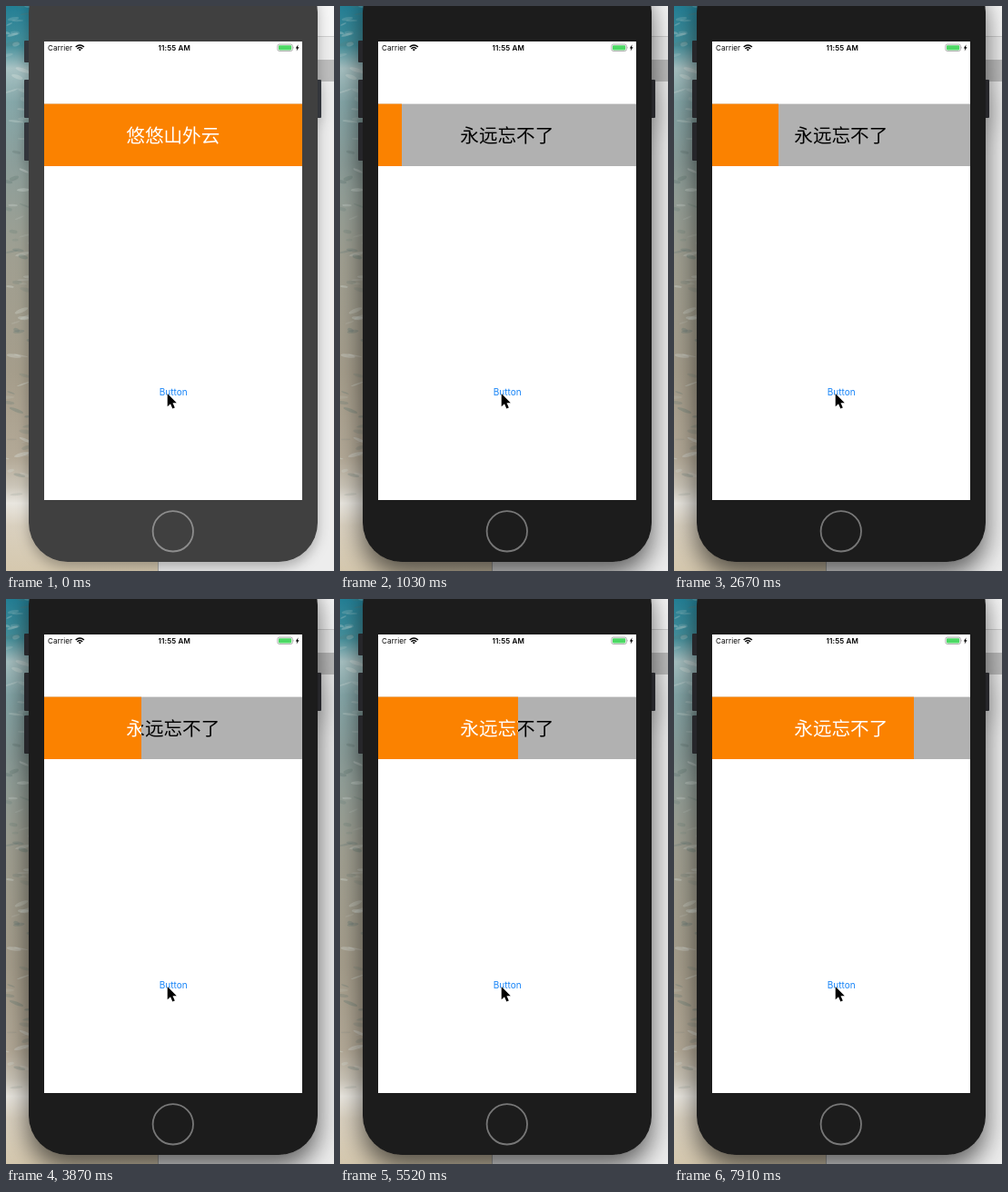
Animation of 361 by 621 pixels, one loop 8000 ms. Source, as an HTML page:

```html
<!DOCTYPE html>
<html lang="zh-CN">
<head>
<meta charset="utf-8">
<title>Banner wipe</title>
<style>
  html, body { margin: 0; width: 100%; height: 100%; overflow: hidden; background: #ececec; }
  svg { display: block; width: 361px; height: 621px; }
  text { font-family: Inter, "Liberation Sans", sans-serif; }
  .title { font: 400 20.6px "Noto Sans CJK SC", "Noto Sans CJK", sans-serif; text-anchor: middle; }
  .bezel { fill: #404040; }
  .key { fill: #31343a; }
  .home { fill: none; stroke: #8d8d8d; stroke-width: 1.8; }
  .phone { filter: url(#softShadow); }
  .active .phone { filter: url(#deepShadow); }
  .active .bezel { fill: #1b1b1b; }
  .active .key { fill: #25272b; }
  .active .home { stroke: #777; }
</style>
</head>
<body>
<svg id="stage" viewBox="0 0 361 621">
  <defs>
    <linearGradient id="beach" x2="0" y2="1">
      <stop offset="0" stop-color="#237f95"/>
      <stop offset=".07" stop-color="#46919d"/>
      <stop offset=".11" stop-color="#a9c3c4"/>
      <stop offset=".17" stop-color="#86a8aa"/>
      <stop offset=".28" stop-color="#8d9f9b"/>
      <stop offset=".45" stop-color="#a09f91"/>
      <stop offset=".65" stop-color="#a59d8b"/>
      <stop offset=".8" stop-color="#b3a997"/>
      <stop offset=".85" stop-color="#cbc5b8"/>
      <stop offset=".88" stop-color="#e9e6df"/>
      <stop offset=".92" stop-color="#d9d0bf"/>
      <stop offset="1" stop-color="#d5c8ae"/>
    </linearGradient>
    <filter id="softShadow" filterUnits="userSpaceOnUse" x="-60" y="-100" width="480" height="800">
      <feDropShadow dx="0" dy="6" stdDeviation="7" flood-opacity=".28"/>
    </filter>
    <filter id="deepShadow" filterUnits="userSpaceOnUse" x="-60" y="-100" width="480" height="800">
      <feDropShadow dx="0" dy="14" stdDeviation="14" flood-opacity=".6"/>
    </filter>
    <clipPath id="beachArea"><rect width="167" height="621"/></clipPath>
    <clipPath id="done"><rect id="doneBox" x="42" y="100" width="284" height="80"/></clipPath>
  </defs>

  <rect width="361" height="621" fill="#ededed"/>
  <rect x="167" width="194" height="33" fill="#f6f6f6"/>
  <rect x="167" y="33" width="194" height="1" fill="#cfcfcf"/>
  <rect x="167" y="59" width="194" height="24" fill="#bcbcbc"/>
  <g clip-path="url(#beachArea)">
    <rect width="167" height="621" fill="url(#beach)"/>
    <g id="ripples"></g>
  </g>
  <rect x="167" y="560" width="1" height="61" fill="#a9a9a6"/>

  <g class="phone">
    <g class="key">
      <rect x="20" y="38" width="7" height="24" rx="1"/>
      <rect x="20" y="81" width="7" height="42" rx="1"/>
      <rect x="20" y="128" width="7" height="42" rx="1"/>
      <rect x="340" y="81" width="7" height="42" rx="1"/>
    </g>
    <rect class="bezel" x="25" y="-36" width="318" height="647" rx="43"/>
  </g>
  <circle class="home" cx="183.8" cy="577.3" r="22.2"/>
  <rect x="42" y="39" width="284" height="504" fill="#fff"/>

  <text x="46" y="49" font-size="8" letter-spacing=".15">Carrier</text>
  <g fill="none" stroke="#000" stroke-width="1.4">
    <path d="M76.7 45.1Q81.3 40.7 85.9 45.1M78.4 46.9Q81.3 44.2 84.2 46.9"/>
    <path d="M79.7 47.8Q81.3 46.6 82.9 47.8L81.3 49.4Z" fill="#000" stroke="none"/>
  </g>
  <text x="185.2" y="49" font-size="8" font-weight="600" letter-spacing=".15" text-anchor="middle">11:55 AM</text>
  <rect x="298.9" y="42.1" width="16.4" height="7.4" rx="1.8" fill="#fff" stroke="#9a9a9a" stroke-width=".8"/>
  <rect x="300" y="43.2" width="14.2" height="5.2" rx=".8" fill="#4cd964"/>
  <path d="M316.4 44.6q1.2 1.2 0 2.4z" fill="#9a9a9a"/>
  <path d="M321.6 42.2L318.8 46.4H320.4L319.7 49.4L322.6 45.2H321Z"/>

  <rect x="42" y="107.6" width="284" height="68.4" fill="#b1b1b1"/>
  <text class="title" id="under" x="183.8" y="149.5"></text>
  <g clip-path="url(#done)">
    <rect x="42" y="107.6" width="284" height="68.4" fill="#fb8200"/>
    <text class="title" id="over" x="183.8" y="149.5" fill="#fff"></text>
  </g>

  <text x="184.2" y="428.3" font-size="10" fill="#1583f7" text-anchor="middle">Button</text>
  <path d="M177.7 426V440.2L181 437.2L183.3 442.5L185.8 441.4L183.5 436.3H187.8Z"
        stroke="#fff" stroke-width="1" stroke-linejoin="round" paint-order="stroke"/>
</svg>
<script>
const LOOP = 8000, WIDTH = 284, LEFT = 42;
const WIPE_START = 100, WIPE_TIME = 10000;
const FIRST = "悠悠山外云", SECOND = "永远忘不了";
const $ = id => document.getElementById(id);

// The screen refreshes every 150 ms, with three slightly shorter ticks.
const shortTicks = [5, 17, 48];
const ticks = [0];
for (let k = 0; k <= 52; k++) {
  ticks.push(140 + 150 * k - 10 * shortTicks.filter(s => k >= s).length);
}

function addRipples() {
  let seed = 7;
  const rnd = () => (seed = seed * 16807 % 2147483647) / 2147483647;
  let marks = "";
  for (let i = 0; i < 75; i++) {
    const y = rnd() * 540, x = rnd() * 27, rx = 3 + rnd() * 6;
    const light = rnd() < (y < 190 ? 0.7 : 0.5);
    marks += `<ellipse cx="${x}" cy="${y}" rx="${rx}" ry="${0.7 + rnd() * 1.6}"
      transform="rotate(${-25 + rnd() * 50} ${x} ${y})"
      fill="${light ? "#e0e8e3" : "#5f7772"}" opacity="${0.12 + rnd() * 0.22}"/>`;
  }
  $("ripples").innerHTML = marks;
}

let shown = -1;
function draw(now) {
  const time = now % LOOP;
  const tick = ticks.findLast(t => t <= time);
  if (tick !== shown) {
    shown = tick;
    const running = tick > 0;
    const done = running ? Math.round(WIDTH * (tick - WIPE_START) / WIPE_TIME) : WIDTH;
    $("stage").classList.toggle("active", running);
    $("under").textContent = $("over").textContent = running ? SECOND : FIRST;
    $("doneBox").setAttribute("width", done);
  }
}

const start = performance.now();
function loop() {
  draw(performance.now() - start);
  requestAnimationFrame(loop);
}
addRipples();
loop();
</script>
</body>
</html>
```
